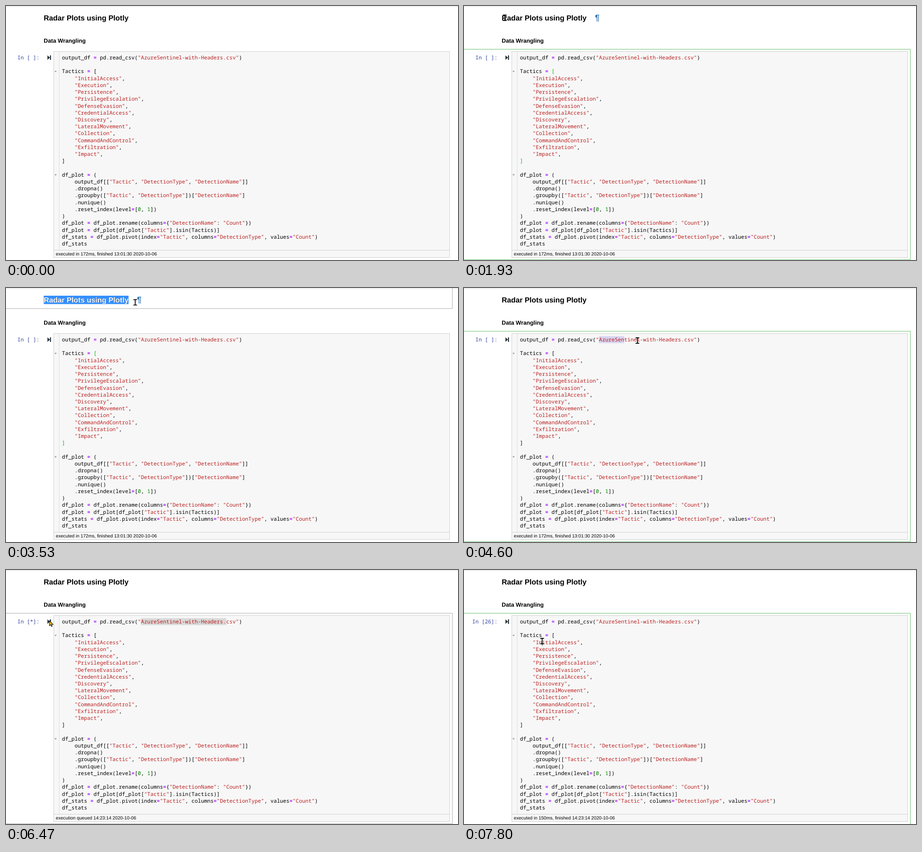
Write an HTML page that moves like this. It is 998x561 px and loops after 8000 ms.

```html
<!DOCTYPE html>
<html lang="en">
<head>
<meta charset="utf-8">
<title>Notebook</title>
<style>
  html, body { margin: 0; width: 100%; height: 100%; overflow: hidden; background: #fff; }
  svg { display: block; width: 998px; height: 561px; }
  text { white-space: pre; text-rendering: geometricPrecision; }
  .code { font: 11.633px "Noto Sans Mono", "DejaVu Sans Mono", monospace; }
  .title { font: bold 16.3px "Liberation Sans", Arial, sans-serif; }
  .sub { font: bold 12.7px "Liberation Sans", Arial, sans-serif; }
  .status { font: 10.16px "Liberation Sans", Arial, sans-serif; }
  .pilcrow { font-size: 18.5px; fill: #337ab7; }
  .str { fill: #ba2121; }
  .op { fill: #aa22ff; font-weight: bold; }
  .num { fill: #008800; }
  .matched .pair { fill: #00bb00; }
</style>
</head>
<body>
<svg viewBox="0 0 998 561">
  <defs>
    <linearGradient id="shade" x2="0" y2="1">
      <stop stop-color="#ececec"/><stop offset="1" stop-color="#fff"/>
    </linearGradient>
    <clipPath id="titleClip"><rect id="titleClipBox" x="83.3" y="17" width="0" height="18.5"/></clipPath>
  </defs>
  <rect width="998" height="4" fill="url(#shade)"/>

  <rect id="titleSel" x="83.3" y="17" width="0" height="18.5" fill="#3390ff"/>
  <text id="title" class="title" x="83.3" y="32">Radar Plots using Plotly</text>
  <text class="title" x="83.3" y="32" fill="#fff" clip-path="url(#titleClip)">Radar Plots using Plotly</text>
  <text id="pilcrow" class="title pilcrow" x="289" y="32">¶</text>
  <text class="sub" x="83.3" y="81">Data Wrangling</text>

  <path id="titleCell" d="M0 45.5H985.5V0" fill="none" stroke="#ababab"/>
  <path id="codeCell" fill="none"/>

  <rect x="105.5" y="100.5" width="874" height="455" fill="#f7f7f7" stroke="#cfcfcf"/>
  <path d="M117.5 101V539" stroke="#ddd"/>
  <path d="M106 539.5H979" stroke="#cfcfcf"/>
  <rect id="flash" x="105" y="539" width="875" height="17" fill="#00bb00"/>
  <text id="status" class="status" x="110" y="551"></text>
  <text id="prompt" class="code" x="74" y="118" text-anchor="end" fill="#303f9f"></text>
  <path d="M91.5 109V119L97 114ZM97 109H99.3V119H97Z" fill="#263238"/>
  <path d="M107 143.2h5l-2.5 3.4zM107 371.5h5l-2.5 3.4z" fill="#999"/>

  <rect id="codeSel" x="298" y="106.5" width="0" height="15.2"/>
  <g id="code" class="code"></g>
  <rect id="caret" width="1" height="15"/>

  <g id="cursor">
    <g id="beam" fill="none">
      <path d="M-4 -6H4M0 -6V6M-4 6H4" stroke="#fff" stroke-opacity=".6" stroke-width="3.2"/>
      <path d="M-4 -6H4M0 -6V6M-4 6H4" stroke="#000" stroke-width="1.8"/>
    </g>
    <path id="arrow" d="M0 0V11L2.6 8.8L4.4 12.8L6.2 12L4.5 8.2H8Z" fill="#f7b500" stroke="#111" stroke-width="1.1"/>
  </g>
</svg>
<script>
const LOOP = 8000, STEP = 200 / 3, LAG = 50, BLINK = 530;
const CHAR = 6.98, LEFT = 123.5, LINE = 15.22, BASE = 118;
const FIRST_PICK = 298, PICKED_CHARS = 27;

// Moments of the story, in ms
const APPEAR = 67, CLICK_LIST = 1267, DRAG_TITLE = 2267, TITLE_DRAGGED = 2867, PICK_TITLE = 3067,
  CLICK_CODE = 4267, DRAG_CODE = 4333, CODE_DRAGGED = 4867,
  RUN = 6133, QUEUED = 6467, DONE = 6667, CLICK_ITEM = 7800;

const $ = id => document.getElementById(id);
const set = (id, attrs) => { for (const k in attrs) $(id).setAttribute(k, attrs[k]); };
const show = (id, on) => { $(id).style.display = on ? '' : 'none'; };
const clamp = (v, lo, hi) => Math.max(lo, Math.min(hi, v));

const source = `output_df = pd.read_csv("AzureSentinel-with-Headers.csv")

Tactics = [
    "InitialAccess",
    "Execution",
    "Persistence",
    "PrivilegeEscalation",
    "DefenseEvasion",
    "CredentialAccess",
    "Discovery",
    "LateralMovement",
    "Collection",
    "CommandAndControl",
    "Exfiltration",
    "Impact",
]

df_plot = (
    output_df[["Tactic", "DetectionType", "DetectionName"]]
    .dropna()
    .groupby(["Tactic", "DetectionType"])["DetectionName"]
    .nunique()
    .reset_index(level=[0, 1])
)
df_plot = df_plot.rename(columns={"DetectionName": "Count"})
df_plot = df_plot[df_plot["Tactic"].isin(Tactics)]
df_stats = df_plot.pivot(index="Tactic", columns="DetectionType", values="Count")
df_stats`;

// Strings, operators, numbers and the list's own bracket pair get a colour class
const highlight = line => line.replace(/("[^"]*")|(=)|(\b\d+\b)|(\[$|^\])/g, (m, str, op, num) =>
  `<tspan class="${str ? 'str' : op ? 'op' : num ? 'num' : 'pair'}">${m}</tspan>`);
$('code').innerHTML = source.split('\n').map((line, i) =>
  `<text x="${LEFT}" y="${(BASE + i * LINE).toFixed(2)}">${highlight(line)}</text>`).join('');

const smooth = f => f * f * (3 - 2 * f);
const easeOut = f => 1 - (1 - f) ** 2;

// The pointer rests between moves
const moves = [
  { from: APPEAR, to: 267, x: 655, y: 434 },
  { from: 533, to: 1000, x: 215, y: 142 },
  { from: CLICK_LIST, to: 1933, x: 90, y: 26 },
  { from: DRAG_TITLE, to: TITLE_DRAGGED, x: 273, y: 26, ease: easeOut },
  { from: PICK_TITLE, to: 3333, x: 285, y: 30 },
  { from: 3467, to: CLICK_CODE, x: FIRST_PICK, y: 116 },
  { from: 4367, to: CODE_DRAGGED, x: 487, y: 116 },
  { from: 5267, to: 5867, x: 105, y: 117 },
  { from: 5867, to: 6067, x: 96, y: 112 },
  { from: DONE, to: 6800, x: 112.5, y: 133 },
  { from: 7600, to: CLICK_ITEM, x: 172.5, y: 157 }
];
function pointer(t) {
  let x = 903, y = 534;
  for (const m of moves) {
    const f = (m.ease || smooth)(clamp((t - m.from) / (m.to - m.from), 0, 1));
    x += (m.x - x) * f;
    y += (m.y - y) * f;
  }
  return { x, y };
}

// A selection ends at the character edge nearest to the slightly late pointer
const dragX = (t, end) => pointer(Math.min(t - LAG, end)).x;

function titleWidth(x) {
  const title = $('title'), left = title.getStartPositionOfChar(0).x;
  let best = left;
  for (let i = 0; i < title.getNumberOfChars(); i++) {
    const edge = title.getEndPositionOfChar(i).x;
    if (Math.abs(edge - x) < Math.abs(best - x)) best = edge;
  }
  return best - left;
}

function draw(time) {
  const t = Math.round(Math.floor((time + 4) / STEP) * STEP);
  const within = (from, to) => t >= from && t < to;
  const { x, y } = pointer(t);
  const done = t >= DONE, queued = t >= QUEUED, itemClicked = t >= CLICK_ITEM;
  const editing = within(CLICK_LIST, DRAG_TITLE) || within(CLICK_CODE, RUN) || itemClicked;

  const overText = y < 40 || (x > 118 && y > 100 && y < 540);
  show('cursor', t >= APPEAR);
  show('beam', overText);
  show('arrow', !overText);
  set('cursor', { transform: `translate(${x.toFixed(1)} ${y.toFixed(1)})` });

  const width = within(DRAG_TITLE, CLICK_CODE) ? titleWidth(dragX(t, TITLE_DRAGGED)) : 0;
  set('titleSel', { width });
  set('titleClipBox', { width });
  show('pilcrow', y < 45);

  show('titleCell', within(PICK_TITLE, CLICK_CODE));
  show('codeCell', within(CLICK_LIST, PICK_TITLE) || t >= CLICK_CODE);
  set('codeCell', {
    d: done ? 'M0 95.5H985.5V561' : 'M0 95.5H985.5V560.5H0',
    stroke: editing ? '#66bb6a' : '#ababab'
  });
  $('code').classList.toggle('matched', within(CLICK_LIST, DRAG_CODE));

  const chars = Math.round((dragX(t, CODE_DRAGGED) - FIRST_PICK) / CHAR);
  set('codeSel', {
    width: within(DRAG_CODE, CLICK_ITEM) ? clamp(chars, 0, PICKED_CHARS) * CHAR : 0,
    fill: editing ? '#d7d4f0' : '#d9d9d9'
  });

  const [col, row] = itemClicked ? [7, 3] : [11, 2];
  show('caret', within(CLICK_LIST, CLICK_LIST + BLINK) || itemClicked);
  set('caret', { x: LEFT + col * CHAR, y: 106.5 + row * LINE });

  $('prompt').textContent = `In [${done ? '26' : queued ? '*' : ' '}]:`;
  $('status').textContent = done ? 'executed in 150ms, finished 14:23:14 2020-10-06'
    : queued ? 'execution queued 14:23:14 2020-10-06'
    : 'executed in 172ms, finished 13:01:30 2020-10-06';
  set('flash', { opacity: done ? clamp(1 - (t - DONE) / 400, 0, 1) : 0 });
}

const start = performance.now();
function tick() {
  draw((performance.now() - start) % LOOP);
  requestAnimationFrame(tick);
}
tick();
</script>
</body>
</html>
```
